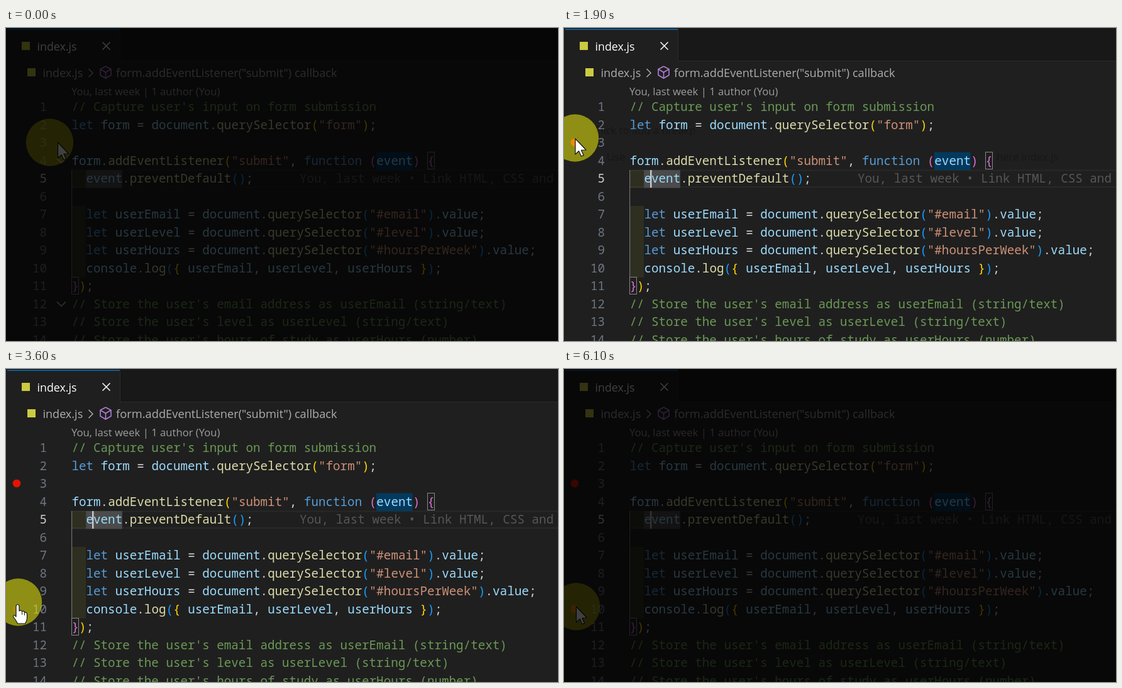
Write an HTML page with a canvas that moves like this. It is 878x498 px and loops after 6200 ms.

```html
<!DOCTYPE html>
<html lang="en">
<head>
<meta charset="utf-8">
<title>Setting breakpoints</title>
<style>
html, body { margin: 0; width: 100%; height: 100%; overflow: hidden; background: #000; }
canvas { display: block; width: 878px; height: 498px; }
</style>
</head>
<body>
<canvas id="stage" width="878" height="498"></canvas>
<script>
const W = 878, H = 498, LOOP = 6200, STEP = 100;
const stage = document.getElementById('stage');
let g = stage.getContext('2d');

const MONO = '500 19.243px "Noto Sans Mono", monospace';
const ui = size => size + 'px "Open Sans", "Noto Sans", sans-serif';
const LEFT = 104, CHAR = 11.546, PITCH = 28.5;
const rowTop = n => 112 + PITCH * (n - 1);
const baseline = n => 132 + PITCH * (n - 1);

const COLORS = {
  c: '#6a9955', k: '#569cd6', v: '#9cdcfe', f: '#dcdcaa', s: '#ce9178',
  p: '#d4d4d4', y: '#ffd700', o: '#da70d6', b: '#179fff'
};

// "~x" switches to colour x.
const query = (name, id) =>
  `  ~klet ~v${name} ~p= ~vdocument~p.~fquerySelector~b(~s"#${id}"~b)~p.~vvalue~p;`;
const CODE = [
  "~c// Capture user's input on form submission",
  '~klet ~vform ~p= ~vdocument~p.~fquerySelector~y(~s"form"~y)~p;',
  '',
  '~vform~p.~faddEventListener~y(~s"submit"~p, ~kfunction ~o(~vevent~o) {',
  '  ~vevent~p.~fpreventDefault~b()~p;',
  '',
  query('userEmail', 'email'),
  query('userLevel', 'level'),
  query('userHours', 'hoursPerWeek'),
  '  ~vconsole~p.~flog~b(~y{ ~vuserEmail~p, ~vuserLevel~p, ~vuserHours ~y}~b)~p;',
  '~o}~y)~p;',
  "~c// Store the user's email address as userEmail (string/text)",
  "~c// Store the user's level as userLevel (string/text)",
  "~c// Store the user's hours of study as userHours (number)"
];

// time, highlight x, y, pointer offset x, y
const PATH = [
  [0, 69.5, 182, 13, 0], [500, 69.5, 182, 13, 0], [800, 62, 196, 4, 2],
  [1400, 47, 196, 0, 0], [1800, 17.5, 175, 0.5, 1], [2200, 17.5, 175, 0.5, 1],
  [2500, 17.5, 248, 0, 8], [2800, 17.5, 303, 0, 5], [3300, 18.5, 345, 0, 4],
  [3600, 19.5, 371, 0, 5], [4000, 19.5, 456, 0, 0], [4200, 19.5, 452, 0, 0],
  [4600, 19.5, 378, 0, 0], [LOOP, 19.5, 378, 0, 0]
];

const clamp = x => Math.max(0, Math.min(1, x));

function pose(t) {
  let i = 1;
  while (PATH[i][0] < t) i++;
  const a = PATH[i - 1], b = PATH[i];
  const u = (t - a[0]) / (b[0] - a[0]);
  return a.slice(1).map((v, j) => v + (b[j + 1] - v) * u);
}

function rect(x, y, w, h, color) {
  g.fillStyle = color;
  g.fillRect(x, y, w, h);
}

function text(s, x, y, font, color) {
  g.font = font;
  g.fillStyle = color;
  g.fillText(s, x, y);
}

function line(points, color, width) {
  g.beginPath();
  points.forEach(([x, y]) => g.lineTo(x, y));
  g.strokeStyle = color;
  g.lineWidth = width;
  g.stroke();
}

function dot(x, y, r, color) {
  g.beginPath();
  g.arc(x, y, r, 0, Math.PI * 2);
  g.fillStyle = color;
  g.fill();
}

function drawHeader() {
  rect(181, 0, W - 181, 53, '#181818');
  rect(181, 52, W - 181, 1, '#2b2b2b');
  rect(181, 2, 1, 50, '#2b2b2b');
  rect(0, 0, W, 1, '#181818');
  rect(2, 1.5, 179, 1.5, '#0b6db8');
  rect(0, 0, 1, H, '#181818');

  rect(25, 22, 13, 13, '#cbcb41');
  text('index.js', 49.5, 36, ui(17.8), '#ffffff');
  line([[153.5, 22.5], [165.5, 34.5]], '#f0f0f0', 1.7);
  line([[165.5, 22.5], [153.5, 34.5]], '#f0f0f0', 1.7);

  rect(34, 64, 13, 13, '#cbcb41');
  text('index.js', 58.5, 78, ui(18), '#adadad');
  line([[131.5, 65], [138, 71.5], [131.5, 78]], '#adadad', 1.5);
  line([[158.5, 61], [167, 65.5], [167, 75], [158.5, 80], [150, 75], [150, 65.5], [158.5, 61]], '#b180d7', 1.6);
  line([[150, 65.5], [158.5, 70.5], [167, 65.5]], '#b180d7', 1.6);
  line([[158.5, 70.5], [158.5, 80]], '#b180d7', 1.6);
  text('form.addEventListener("submit") callback', 175, 78, ui(18.27), '#adadad');
  text('You, last week | 1 author (You)', 104, 107, ui(16.68), '#9d9d9d');
}

function drawCode() {
  const indent = 2 * CHAR, tint = 'rgba(255,255,64,.07)';
  rect(LEFT, 225.5, W - LEFT, 2, '#292929');
  rect(LEFT, 252, W - LEFT, 2, '#292929');
  rect(LEFT, rowTop(5), indent, PITCH, tint);
  rect(LEFT, rowTop(7), indent, 4 * PITCH, tint);
  rect(LEFT, 226, 1.2, rowTop(11) - 226, '#707070');
  rect(LEFT + 42 * CHAR, rowTop(4), 5 * CHAR, PITCH, '#04395e');
  rect(LEFT + indent, rowTop(5), 5 * CHAR, PITCH, '#4b4b4b');
  g.strokeStyle = '#888888';
  g.lineWidth = 1;
  g.strokeRect(670.5, 197.5, 11, 27);
  g.strokeRect(104.5, 396.5, 11, 27);

  CODE.forEach((source, i) => {
    const n = i + 1, y = baseline(n);
    g.textAlign = 'right';
    text(n, 65, y, MONO, n === 5 ? '#cccccc' : '#6e7681');
    g.textAlign = 'left';
    let col = 0;
    source.split('~').forEach((part, j) => {
      const s = j ? part.slice(1) : part;
      text(s, LEFT + 0.4 + col * CHAR, y, MONO, j ? COLORS[part[0]] : COLORS.p);
      col += s.length;
    });
  });
  text('You, last week • Link HTML, CSS and', 467, baseline(5), MONO, '#565656');
}

function drawArrow(x, y) {
  g.beginPath();
  [[0, 0], [0, 25], [5.6, 19.7], [9.4, 28], [13.2, 26.4], [9.5, 18.4], [17, 18]]
    .forEach(([px, py]) => g.lineTo(x + px, y + py));
  g.closePath();
  paintPointer();
}

function drawHand(x, y) {
  g.save();
  g.translate(x, y);
  g.beginPath();
  g.moveTo(-2.5, 18);
  g.lineTo(-2.5, 1);
  g.quadraticCurveTo(0, -4, 2.5, 1);
  g.lineTo(2.5, 9);
  g.quadraticCurveTo(6, 6.5, 7, 10);
  g.quadraticCurveTo(10, 8, 11, 11.5);
  g.quadraticCurveTo(15, 10, 15, 15);
  g.lineTo(15, 21);
  g.quadraticCurveTo(14.5, 25, 12, 29);
  g.lineTo(0, 29);
  g.quadraticCurveTo(-3, 23, -7, 18);
  g.quadraticCurveTo(-7, 13.5, -2.5, 18);
  g.closePath();
  paintPointer();
  line([[7, 10], [7, 15]], '#222222', 1);
  line([[11, 11.5], [11, 16]], '#222222', 1);
  g.restore();
}

function paintPointer() {
  g.fillStyle = '#ffffff';
  g.fill();
  g.strokeStyle = '#111111';
  g.lineWidth = 1.2;
  g.lineJoin = 'round';
  g.stroke();
}

function drawFolds(t) {
  g.globalAlpha = clamp((1600 - t) / 300);
  [211, 439].forEach(y =>
    line([[81, y - 3.5], [88, y + 3.5], [95, y - 3.5]], '#c5c5c5', 1.7));
  g.globalAlpha = 1;
}

function drawBreakpoints(t, y) {
  const red = '#e51400', dim = 'rgba(229,20,0,.3)';
  const third = 182, tenth = 382;
  if (t >= 1800) dot(17, third, 6.3, red);
  if (t >= 4700) dot(17, tenth, 6.3, red);
  else if (t >= 2300) {
    const row = Math.floor((y - 4 - rowTop(1)) / PITCH);
    const hint = 126 + row * PITCH;
    if (Math.abs(hint - third) > 5) dot(17, hint, 6.3, dim);
  }
}

const base = document.createElement('canvas');
function prepare() {
  const screen = g;
  base.width = W;
  base.height = H;
  g = base.getContext('2d');
  rect(0, 0, W, H, '#1f1f1f');
  drawHeader();
  drawCode();
  g = screen;
}

function draw(t) {
  const [cx, cy, dx, dy] = pose(t);
  const x = cx + dx, y = cy + dy;
  g.drawImage(base, 0, 0);

  // Hover hint as it fades away
  if (t >= 1800 && t < 2100) {
    const shade = 'rgba(0,0,0,.28)';
    text('Click to add a breakp', 48, 169, ui(16.6), shade);
    text('Use', 68, 211, ui(16.6), shade);
    text('here index.js', 688, 211, ui(16.6), shade);
  }

  drawFolds(t);
  drawBreakpoints(t, y);
  if (t >= 5500 || Math.floor(t / 500) % 2) rect(137, 226, 2.5, 28, '#c8c8c8');
  dot(cx, cy, 37.7, 'rgba(245,245,13,.52)');
  if (t >= 3400 && t < 4300) drawHand(x - 1, y);
  else drawArrow(x, y);

  const light = Math.min(1, 0.25 + 0.75 * t / 400, 1 - 0.75 * (t - 5700) / 400);
  if (light < 1) rect(0, 0, W, H, `rgba(0,0,0,${1 - light})`);
}

function frame() {
  const t = performance.now() % LOOP;
  const held = Math.floor(t / STEP) * STEP;
  draw(held >= 5500 && held < 5800 ? 5500 : held);
  requestAnimationFrame(frame);
}

prepare();
frame();
</script>
</body>
</html>
```
